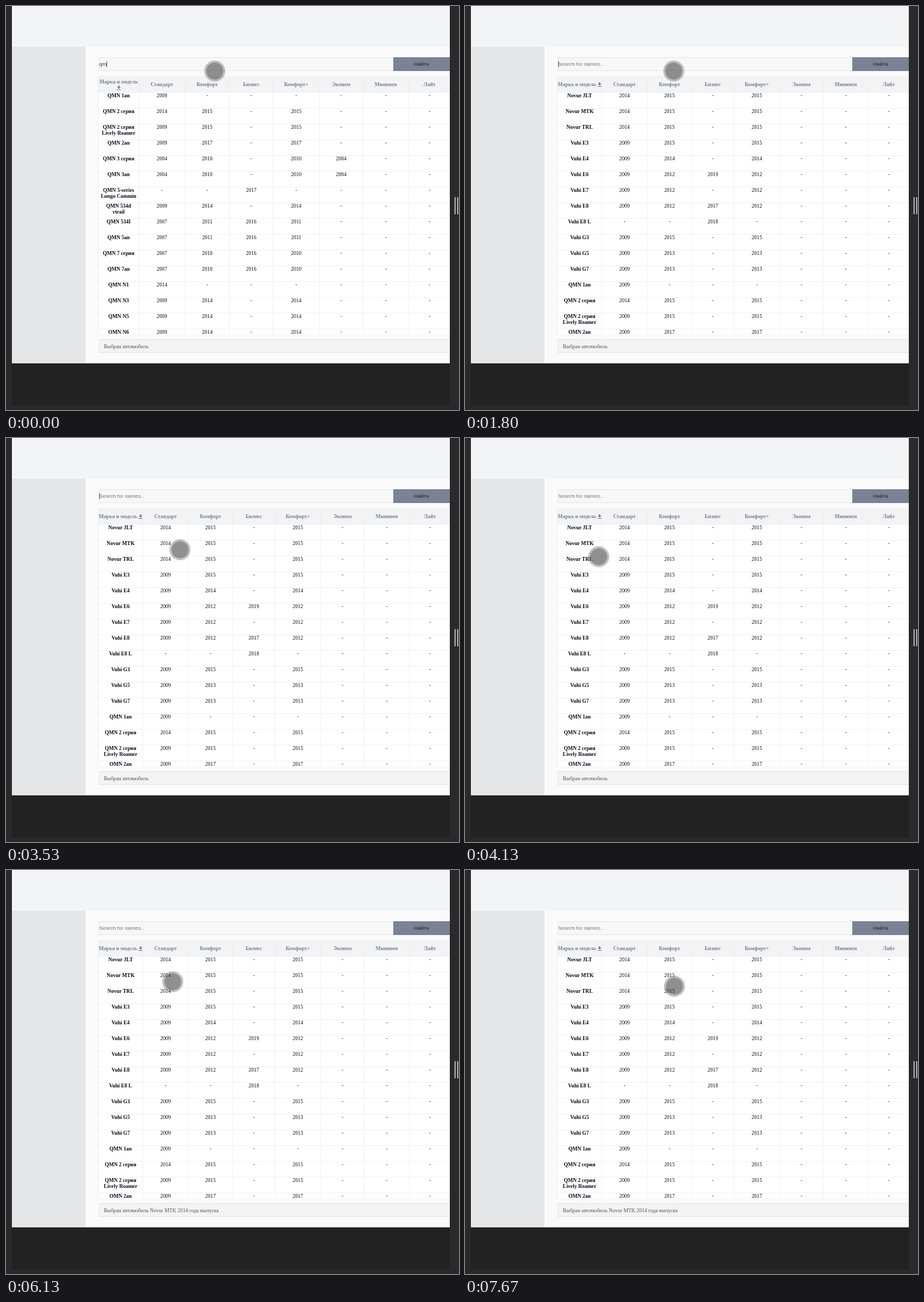
Recreate the animation shown at these times as an HTML page. Size 690 by 615 pixels, loop 8 s.

```html
<!DOCTYPE html>
<html lang="ru">
<head>
<meta charset="utf-8">
<title>Таблица автомобилей</title>
<style>
html, body { margin: 0; width: 100%; height: 100%; overflow: hidden; background: #2a2a2a; }
#stage { position: relative; width: 690px; height: 615px; overflow: hidden; }
#stage div, #stage svg { position: absolute; box-sizing: border-box; }
#stage .floor { left: 9px; top: 544px; width: 667px; height: 64px; background: #222; }
#stage .page { left: 9px; top: 0; width: 667px; height: 544px; background: #fafafa; overflow: hidden; }
#stage .view { left: -9px; top: 0; width: 690px; height: 544px; }
#stage .top { left: 9px; top: 0; width: 667px; height: 62px; background: #f3f4f6; }
#stage .side { left: 9px; top: 62px; width: 112px; height: 482px; background: #e4e6e8; }
#stage .grip { top: 291px; width: 2px; height: 26px; background: #a8a8a8; }

.sans { font: 8px/9px "Liberation Sans", Arial, sans-serif; white-space: pre; }
.serif { font: 8px/9px "Liberation Serif", "Times New Roman", serif; }
#stage .input { left: 141px; top: 78px; width: 449px; height: 21px; background: #f7f7f7; border: 1px solid #e6e8eb; }
#stage .button { left: 590px; top: 78px; width: 86px; height: 21px; background: #7a8295; color: #222; line-height: 21px; text-align: center; }
#stage .typed { left: 142px; top: 84px; color: #333; }
#stage .hint { left: 142px; top: 84px; color: #757575; }
#stage .caret { left: 0; top: 84px; width: 1px; height: 9px; background: #666; }
#stage .status { left: 141px; top: 507px; width: 560px; height: 21px; padding: 6px 7px; background: #f2f3f5; border: 1px solid #e4e7ea; color: #66524f; white-space: pre; }

#stage .table { left: 0; top: 107px; width: 690px; height: 392px; overflow: hidden; }
#stage .cell { height: 24px; text-align: center; background: #fff; color: #0a0a18;
  border: solid #f1f2f4; border-width: 1px 1px 0 0; white-space: pre-line; }
#stage .name { font-weight: bold; }
#stage .head { padding-top: 7px; font-weight: bold; color: #7b8292; background: #f2f3f5; border-color: #eceef0; }
#stage .model { white-space: nowrap; }
#stage .edge { left: 140px; top: 0; width: 1px; height: 392px; background: #eff0f2; }
#stage .cursor { left: -16px; top: -16px; width: 32px; height: 32px; border-radius: 50%;
  background: rgba(70,70,70,.6) padding-box; border: 3px solid rgba(110,110,110,.42); animation: move 8s infinite step-end; }

.anim { animation: 8s infinite step-end; }
#filtered, .second { animation-name: untilFirstErase; }
#partial { animation-name: oneLetter; }
#all, .hint { animation-name: emptyField; }
.first { animation-name: untilEmpty; }
.third { animation-name: thirdLetter; }
.caret { animation-name: blink; }
.chosen { animation-name: choose; }
@keyframes untilFirstErase { 0% { visibility: visible } 18.36%, 100% { visibility: hidden } }
@keyframes untilEmpty { 0% { visibility: visible } 22.48%, 100% { visibility: hidden } }
@keyframes oneLetter { 0% { visibility: hidden } 18.36% { visibility: visible } 22.48%, 100% { visibility: hidden } }
@keyframes emptyField { 0% { visibility: hidden } 22.48%, 100% { visibility: visible } }
@keyframes thirdLetter { 0% { visibility: hidden } 6.61% { visibility: visible } 15.86%, 100% { visibility: hidden } }
@keyframes choose { 0% { visibility: hidden } 76.61%, 100% { visibility: visible } }
@keyframes blink {
  0% { transform: translateX(153px); opacity: 1 }
  2.48% { transform: translateX(153px); opacity: 0 }
  6.61% { transform: translateX(158px); opacity: 1 }
  12.48% { transform: translateX(158px); opacity: 0 }
  18.36% { transform: translateX(147px); opacity: 1 }
  22.48% { transform: translateX(142px); opacity: 1 }
  24.98% { transform: translateX(142px); opacity: 0 }
  30.86% { transform: translateX(142px); opacity: 1 }
  37.48% { transform: translateX(142px); opacity: 0 }
  44.11% { transform: translateX(142px); opacity: 1 }
  50.73% { transform: translateX(142px); opacity: 0 }
  57.48% { transform: translateX(142px); opacity: 1 }
  59.11%, 100% { transform: translateX(142px); opacity: 0 }
}
@keyframes move {
  0% { transform: translate(318px, 99px) }
  35.86% { transform: translate(284px, 175px); animation-timing-function: steps(4) }
  39.11% { transform: translate(264px, 225px) }
  40.86% { transform: translate(264px, 214px); animation-timing-function: steps(4) }
  44.11% { transform: translate(265px, 170px) }
  47.48% { transform: translate(253px, 172px); animation-timing-function: steps(6) }
  52.48% { transform: translate(179px, 185px) }
  55.86% { transform: translate(179px, 184px); animation-timing-function: steps(4) }
  59.11% { transform: translate(178px, 180px) }
  60.86% { transform: translate(178px, 181px) }
  63.36% { transform: translate(232px, 181px); animation-timing-function: steps(3) }
  65.86% { transform: translate(275px, 182px) }
  68.36% { transform: translate(272px, 180px); animation-timing-function: steps(6) }
  73.36% { transform: translate(254px, 170px) }
  84.98% { transform: translate(259px, 171px); animation-timing-function: steps(12) }
  94.98% { transform: translate(317px, 177px) }
  95.86%, 100% { transform: translate(319px, 177px) }
}
</style>
</head>
<body>
<div id="stage">
  <div class="floor"></div>
  <div class="page"><div class="view">
    <div class="top"></div>
    <div class="side"></div>
    <div class="input"></div>
    <div class="button sans">Найти</div>
    <div class="typed sans"><span class="anim first">q</span><span class="anim second">m</span><span class="anim third">n</span></div>
    <div class="hint sans anim">Search for names..</div>
    <div class="caret anim"></div>
    <div class="table serif anim" id="filtered"></div>
    <div class="table serif anim" id="partial"></div>
    <div class="table serif anim" id="all"></div>
    <div class="status serif">Выбран автомобиль<span class="anim chosen"> Novur MTK 2014 года выпуска</span></div>
  </div></div>
  <div class="grip" style="left:683px"></div>
  <div class="grip" style="left:687px"></div>
  <div class="cursor"></div>
</div>
<script>
const heads = ['Марка и модель', 'Стандарт', 'Комфорт', 'Бизнес', 'Комфорт+', 'Эконом', 'Минивен', 'Лайт'];

// name | standard, comfort, business, comfort+, economy ("/" breaks the name)
const parse = text => text.trim().split('\n').map(line => {
  const [name, years] = line.split('|');
  return [name.replace('/', '\n'), ...years.split(' '), '-', '-'];
});

const early = parse(`
Novur JLT|2014 2015 - 2015 -
Novur MTK|2014 2015 - 2015 -
Novur TRL|2014 2015 - 2015 -
Vuhi E3|2009 2015 - 2015 -
Vuhi E4|2009 2014 - 2014 -
Vuhi E6|2009 2012 2019 2012 -
Vuhi E7|2009 2012 - 2012 -
Vuhi E8|2009 2012 2017 2012 -
Vuhi E8 L|- - 2018 - -
Vuhi G3|2009 2015 - 2015 -
Vuhi G5|2009 2013 - 2013 -
Vuhi G7|2009 2013 - 2013 -`);

const found = parse(`
QMN 1an|2009 - - - -
QMN 2 серия|2014 2015 - 2015 -
QMN 2 серия/Lively Roamer|2009 2015 - 2015 -
QMN 2an|2009 2017 - 2017 -
QMN 3 серия|2004 2010 - 2010 2004
QMN 3an|2004 2010 - 2010 2004
QMN 5-series/Lungo Cammin|- - 2017 - -
QMN 534d/vtrail|2009 2014 - 2014 -
QMN 534I|2007 2011 2016 2011 -
QMN 5an|2007 2011 2016 2011 -
QMN 7 серия|2007 2010 2016 2010 -
QMN 7an|2007 2010 2016 2010 -
QMN N1|2014 - - - -
QMN N3|2009 2014 - 2014 -
QMN N5|2009 2014 - 2014 -
QMN N6|2009 2014 - 2014 -`);

const sortIcon = (x, y) =>
  `<svg style="left:${x}px;top:${y}px" width="6" height="7"><path d="M2 0h2v2.5h2L3 5.3 0 2.5h2zM0 6h6v1H0z" fill="#7b8292"/></svg>`;

function buildTable(id, edges, rows, oneLine) {
  const cell = (kind, col, y, text, style = '') =>
    `<div class="cell ${kind}" style="left:${edges[col]}px;top:${y}px;width:${edges[col + 1] - edges[col]}px;${style}">${text}</div>`;
  const modelPadding = oneLine ? 'padding-right:8px' : 'padding-top:3px';
  let html = heads.map((text, col) =>
    col ? cell('head', col, 0, text) : cell('head model', col, 0, text, modelPadding)).join('');
  html += oneLine ? sortIcon(202, 9) : sortIcon((edges[0] + edges[1]) / 2 - 3, 14);
  rows.forEach((row, i) => row.forEach((text, col) => {
    html += cell(col ? 'year' : 'name', col, 24 + i * 24, text);
  }));
  document.getElementById(id).innerHTML = html + '<div class="edge"></div>';
}

buildTable('filtered', [141, 203, 273, 341, 407, 478, 544, 614, 677], found, false);
buildTable('partial', [141, 206, 275, 343, 408, 479, 545, 614, 677], found, false);
buildTable('all', [141, 209, 278, 346, 410, 480, 546, 615, 677], [...early, ...found.slice(0, 4)], true);
</script>
</body>
</html>
```
